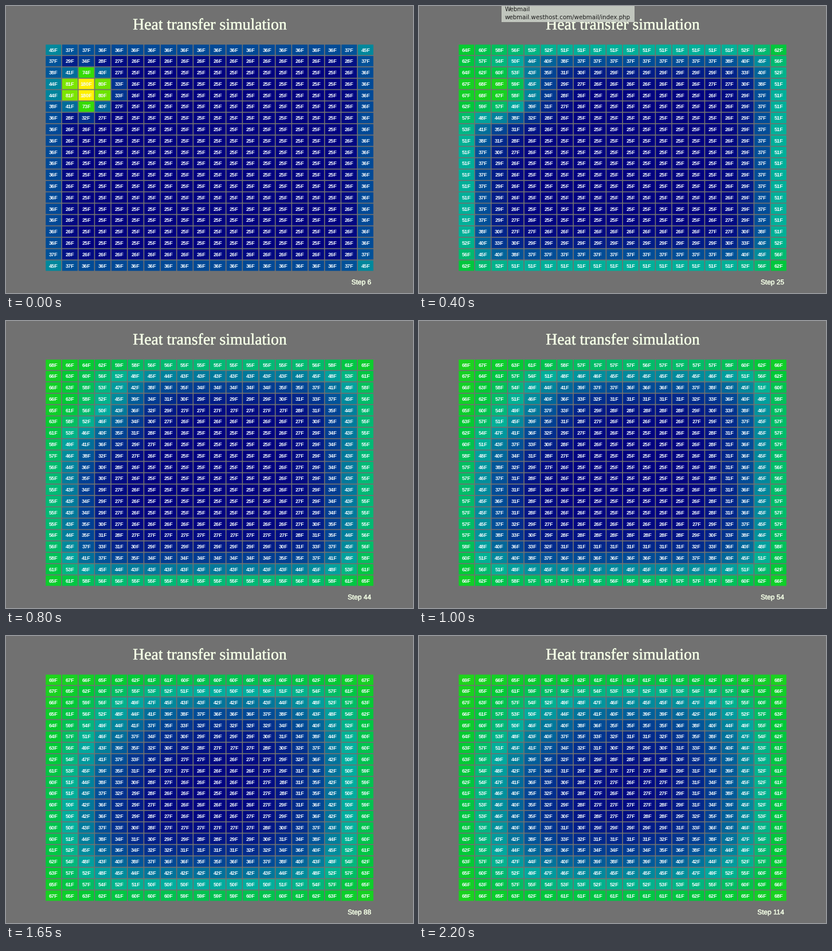
Write a matplotlib script that moves like this. It is 710x500 px and loops after 2250 ms.

```python
import math

import numpy as np
import matplotlib.pyplot as plt
from matplotlib.animation import FuncAnimation
from matplotlib.collections import PatchCollection
from matplotlib.colors import LinearSegmentedColormap
from matplotlib.patches import Rectangle
from matplotlib.patheffects import withStroke

W, H, DPI = 710, 500, 100
N = 20                      # cells per side
FRAMES, INTERVAL = 45, 50
COLD, ROOM, HOT = 25, 70, 400
RATE = 0.063                # share of heat passed to each neighbour per step

LEFT, TOP = 69.3, 67.3
PITCH_X, PITCH_Y = 28.66, 19.79
CELL_W, CELL_H = 27.0, 18.1

GRAY, IVORY, INK = "#717171", "#f4ffe6", "#1c1c1c"
HEAT = LinearSegmentedColormap.from_list("heat", [
    "#000080", "#005499", "#00ae9e", "#00c937", "#3cde00", "#beec00", "#fff000"])


def simulate(steps):
    """Temperatures at each step; room air surrounds the plate."""
    grid = np.full((N, N), float(COLD))
    grid[3:5, 2] = HOT
    states = [grid, grid]
    for _ in range(steps - 1):
        p = np.pad(grid, 1, constant_values=ROOM)
        around = p[:-2, 1:-1] + p[2:, 1:-1] + p[1:-1, :-2] + p[1:-1, 2:]
        grid = grid + RATE * (around - 4 * grid)
        states.append(grid)
    return states


def step_at(frame):
    """Steady pace with a slow sway."""
    sway = math.sin(math.tau * (frame - 2) / (FRAMES - 1))
    return int(6.25 + 27 / 11 * frame - sway)


def write(x, y, s, px, font, color, **kw):
    return ax.text(x, y, s, fontsize=px * 72 / DPI, family=font, color=color,
                   va="baseline", **kw)


states = simulate(step_at(FRAMES - 1))

fig = plt.figure(figsize=(W / DPI, H / DPI), dpi=DPI, facecolor=GRAY)
ax = fig.add_axes([0, 0, 1, 1])
ax.set(xlim=(0, W), ylim=(H, 0))
ax.axis("off")

thicken = [withStroke(linewidth=0.25, foreground=IVORY)]
write(355.5, 41, "Heat transfer simulation", 27.8, "Liberation Serif", IVORY,
      ha="center", path_effects=thicken)
step_label = write(637, 485, "", 11.9, "Liberation Sans", IVORY,
                   ha="right", path_effects=thicken)

rects, labels = [], []
for row in range(N):
    for col in range(N):
        x, y = LEFT + col * PITCH_X, TOP + row * PITCH_Y
        rects.append(Rectangle((x, y), CELL_W, CELL_H))
        labels.append(write(x + CELL_W / 2, y + CELL_H / 2 + 3.2, "", 9.2,
                            "Liberation Sans", "#f6fbff", weight="bold", ha="center"))
cells = ax.add_collection(PatchCollection(rects, cmap=HEAT, linewidth=0, snap=False))
cells.set_clim(COLD, 100)

tip_text = dict(px=10.3, font="DejaVu Sans", color=INK, zorder=6)
tooltip = [
    ax.add_patch(Rectangle((144, -2), 232, 30, fc="#c6cbc3", alpha=0.94, lw=0, zorder=5)),
    write(150, 9, "Webmail", **tip_text),
    write(150, 23, "webmail.westhost.com/webmail/index.php", **tip_text),
]


def draw(frame):
    step = step_at(frame)
    temps = states[step].ravel()
    cells.set_array(temps)
    for label, t in zip(labels, temps):
        label.set_text(f"{t:.0f}F")
    step_label.set_text(f"Step {step}")
    for part in tooltip:
        part.set_visible(3 <= frame <= 8)
    return [cells, step_label, *labels, *tooltip]


anim = FuncAnimation(fig, draw, frames=FRAMES, interval=INTERVAL, repeat=True, repeat_delay=0)
plt.show()
```
